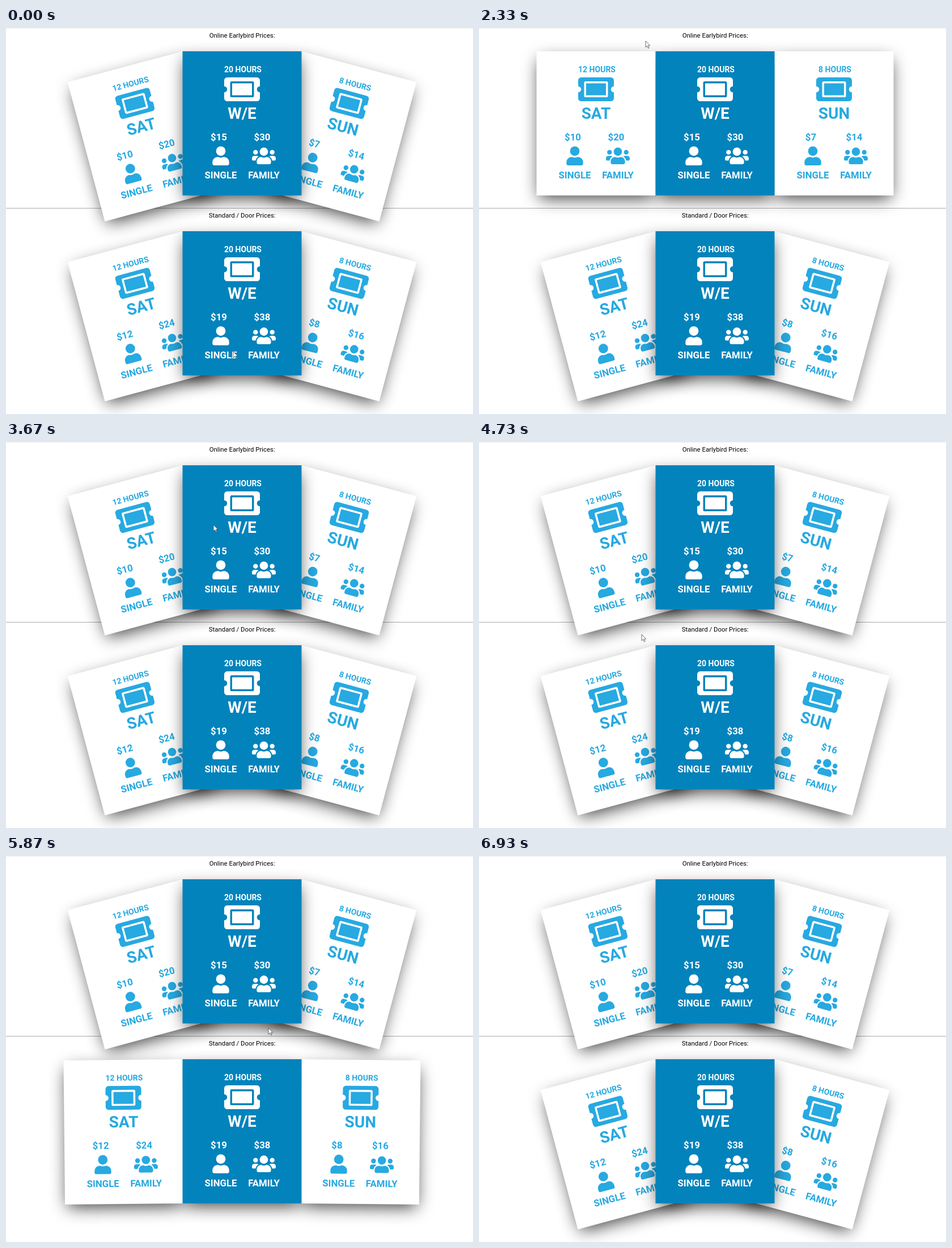
Recreate the animation shown at these times as an HTML page. Size 824 px wide and 680 px high, loop 7990 ms.

```html
<!DOCTYPE html>
<html lang="en">
<head>
<meta charset="utf-8">
<title>Ticket prices</title>
<style>
  html, body { margin: 0; width: 100%; height: 100%; overflow: hidden; background: #fff; }
  svg { display: block; }
  text { font: bold 16.8px Roboto, sans-serif; text-anchor: middle; }
  .hours { font-size: 14px; }
  .day { font-size: 28px; }
  .heading { font-weight: 400; font-size: 11.4px; }
  .shadow { fill: rgba(0, 0, 0, .75); filter: blur(15px); }
</style>
</head>
<body>
<svg id="stage" width="824" height="680" viewBox="0 0 824 680">
  <defs>
    <path id="ticket" fill-rule="evenodd" d="M48 64H528a48 48 0 0 1 48 48v96a48 48 0 0 0 0 96v96a48 48 0 0 1-48 48H48a48 48 0 0 1-48-48v-96a48 48 0 0 0 0-96v-96a48 48 0 0 1 48-48zM120 128a24 24 0 0 0-24 24V360a24 24 0 0 0 24 24H456a24 24 0 0 0 24-24V152a24 24 0 0 0-24-24zM128 160H448V352H128z"/>
    <g id="single">
      <circle cx="224" cy="128" r="128"/>
      <path d="M134 288h17a175 175 0 0 0 146 0h17a134 134 0 0 1 134 134v42a48 48 0 0 1-48 48H48a48 48 0 0 1-48-48v-42a134 134 0 0 1 134-134z"/>
    </g>
    <g id="sibling">
      <circle cx="96" cy="160" r="64"/>
      <path d="M173 275A64 64 0 0 0 128 256H64A64 64 0 0 0 0 320v32a32 32 0 0 0 32 32h66A155 155 0 0 1 173 275z"/>
    </g>
    <g id="family">
      <use href="#sibling"/>
      <use href="#sibling" transform="translate(640) scale(-1 1)"/>
      <circle cx="320" cy="144" r="112"/>
      <path d="M243 288h8a158 158 0 0 0 138 0h8a115 115 0 0 1 115 115v29a48 48 0 0 1-48 48H176a48 48 0 0 1-48-48v-29a115 115 0 0 1 115-115z"/>
    </g>
  </defs>
  <path d="M0 .5H824" stroke="#eee"/>
  <path d="M0 317.5H824" stroke="#aaa"/>
  <g id="sections"></g>
  <path id="cursor" d="M0 0v11l2.6-2.4 1.8 4.1 1.7-.7-1.8-4H7.8z" fill="#fff" stroke="#333" stroke-width=".7"/>
</svg>
<script>
const LIGHT = '#27a9e1', DARK = '#0383bc';
const CARD_W = 210, CARD_H = 254, LEFT = 311.5, TOP = 41, PITCH = 317;
const LOOP = 7990, FRAME = 1000 / 15, TILT = 15, SWING = 200;

const label = (x, y, str, cls = '') => `<text class="${cls}" x="${x}" y="${y}">${str}</text>`;
const icon = (id, x, y, height) =>
  `<use href="#${id}" transform="translate(${x} ${y}) scale(${height / 512})"/>`;
const shadow = (cls = '') =>
  `<rect class="shadow ${cls}" x="5" y="15" width="${CARD_W - 10}" height="${CARD_H - 10}"/>`;
const place = (column, content) =>
  `<g class="card" data-column="${column}">${content}</g>`;

function face(back, ink, hours, day, single, family) {
  return `<rect width="${CARD_W}" height="${CARD_H}" fill="${back}"/>
    <g fill="${ink}">
      ${label(106.5, 36.5, hours + ' HOURS', 'hours')}
      ${icon('ticket', 73.5, 39, 56)}
      ${label(105, 119, day, 'day')}
      ${label(64, 156.7, '$' + single)}${label(140.5, 156.7, '$' + family)}
      ${icon('single', 52.8, 167.4, 33.6)}${icon('family', 122.5, 167.4, 33.6)}
      ${label(67.5, 223.7, 'SINGLE')}${label(143.5, 223.7, 'FAMILY')}
    </g>`;
}

// The middle shadow fades from behind the side cards to in front as they fan out.
function section(row, title, sat, weekend, sun) {
  return `<g class="section" transform="translate(0 ${row * PITCH})">
    ${label(416.7, 17, title, 'heading')}
    ${place(0, shadow('behind'))}
    ${place(-1, shadow() + face('#fff', LIGHT, 12, 'SAT', ...sat))}
    ${place(1, shadow() + face('#fff', LIGHT, 8, 'SUN', ...sun))}
    ${place(0, shadow('front') + face(DARK, '#fff', 20, 'W/E', ...weekend))}
  </g>`;
}

document.getElementById('sections').innerHTML =
  section(0, 'Online Earlybird Prices:', [10, 20], [15, 30], [7, 14]) +
  section(1, 'Standard / Door Prices:', [12, 24], [19, 38], [8, 16]);

const sections = [...document.querySelectorAll('.section')];
const cursor = document.getElementById('cursor');

// When each section flattens and fans out again, in ms.
const swings = [{ open: 1710, close: 3195 }, { open: 4830, close: 5843 }];

// Pointer moves: start, end, x, y.
const home = [401, 570];
const moves = [
  [0, 330, 697, 400], [330, 730, 564, 217], [1130, 1660, 342, 134],
  [1870, 2330, 294, 23], [2950, 3130, 371, 134], [3600, 4730, 287, 339],
  [4800, 5100, 350, 450], [5600, 5860, 463, 303], [6000, 6460, 500, 674],
  [6650, 6930, -20, 674]
];

const progress = (t, start, end) => Math.min(1, Math.max(0, (t - start) / (end - start)));
const ease = p => p * p * (3 - 2 * p);

function pointerAt(t) {
  return moves.reduce(([x, y], [start, end, toX, toY]) => {
    const p = progress(t, start, end);
    return [x + (toX - x) * p, y + (toY - y) * p];
  }, home);
}

function draw(time) {
  // The picture advances at 15 frames per second.
  const t = Math.floor((time % LOOP + 5) / FRAME) * FRAME;
  sections.forEach((el, row) => {
    const { open, close } = swings[row];
    const fanned = 1 - ease(progress(t, open, open + SWING)) + ease(progress(t, close, close + SWING));
    for (const card of el.querySelectorAll('.card')) {
      const column = +card.dataset.column;
      // Side cards swing around the top corner they share with the middle card.
      const pivot = column < 0 ? CARD_W : 0;
      card.setAttribute('transform',
        `translate(${LEFT + column * CARD_W} ${TOP}) rotate(${column * TILT * fanned} ${pivot} 0)`);
    }
    el.querySelector('.front').style.opacity = fanned;
    el.querySelector('.behind').style.opacity = 1 - fanned;
  });
  cursor.setAttribute('transform', `translate(${pointerAt(t)})`);
}

const begin = performance.now();
(function loop() {
  draw(performance.now() - begin);
  requestAnimationFrame(loop);
})();
</script>
</body>
</html>
```
